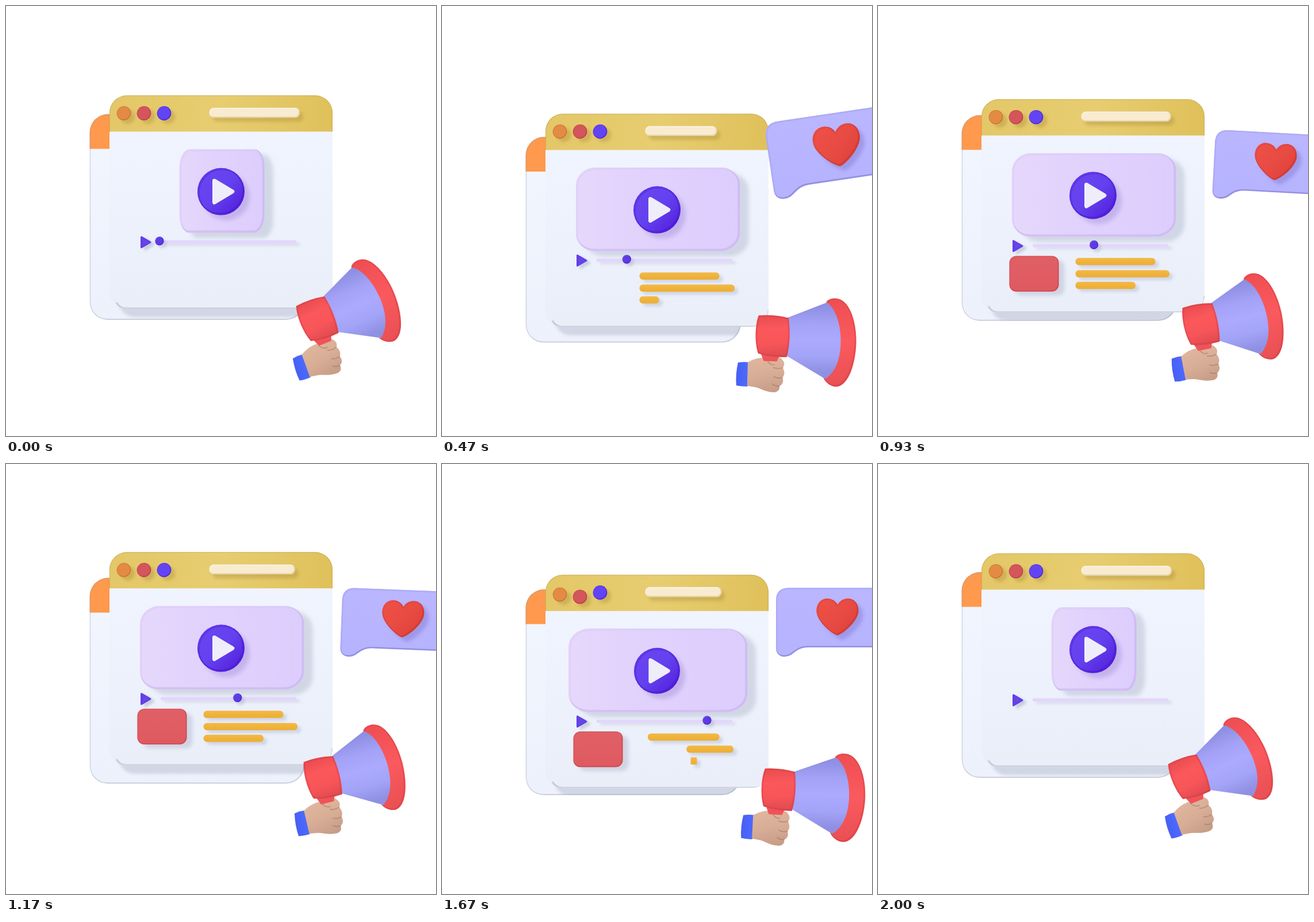
These frames come from a looping animation (748x748 px, 2030 ms). An HTML page with a canvas:

```html
<!DOCTYPE html>
<html lang="en">
<head>
<meta charset="utf-8">
<title>Video window and megaphone</title>
<style>
html, body { margin: 0; width: 100%; height: 100%; overflow: hidden; background: #fff; }
canvas { display: block; width: 748px; height: 748px; }
</style>
</head>
<body>
<canvas id="stage" width="748" height="748"></canvas>
<script>
const ctx = document.getElementById('stage').getContext('2d');
const LOOP = 2030, STEP = 1000 / 30;

// Monotone cubic through [frame, value, frame, value, ...], flat at the ends and turning points.
function track(f, keys) {
  const n = keys.length / 2, x = i => keys[2 * i], y = i => keys[2 * i + 1];
  if (f <= x(0)) return y(0);
  if (f >= x(n - 1)) return y(n - 1);
  const slope = i => (y(i + 1) - y(i)) / (x(i + 1) - x(i));
  const tangent = i => {
    if (i === 0 || i === n - 1) return 0;
    const a = slope(i - 1), b = slope(i);
    return a * b <= 0 ? 0 : 2 * a * b / (a + b);
  };
  let i = 0;
  while (f > x(i + 1)) i++;
  const h = x(i + 1) - x(i), u = (f - x(i)) / h, s = u * u * (3 - 2 * u);
  return y(i) + (y(i + 1) - y(i)) * s +
    h * u * (1 - u) * ((1 - u) * tangent(i) - u * tangent(i + 1));
}

const wave = (f, peak) => Math.cos((f - peak) * Math.PI / 15);

function bump(f, peak, half) {
  const d = Math.abs(f - peak);
  return d < half ? (1 + Math.cos(Math.PI * d / half)) / 2 : 0;
}

function box(x, y, w, h, r) {
  const p = new Path2D();
  p.roundRect(x, y, Math.max(w, 0), h, r);
  return p;
}

function disc(x, y, r) {
  const p = new Path2D();
  p.arc(x, y, r, 0, Math.PI * 2);
  return p;
}

function ramp(x0, y0, x1, y1, ...colors) {
  const g = ctx.createLinearGradient(x0, y0, x1, y1);
  colors.forEach((c, i) => g.addColorStop(i / (colors.length - 1), c));
  return g;
}

function paint(path, fill, dx = 0, dy = 0, blur = 0, shade = 'rgba(125,135,160,.25)') {
  ctx.save();
  if (dx || dy) {
    ctx.shadowColor = shade;
    ctx.shadowOffsetX = dx;
    ctx.shadowOffsetY = dy;
    ctx.shadowBlur = blur;
  }
  ctx.fillStyle = fill;
  ctx.fill(path);
  ctx.restore();
}

// Lit rim at the top left and shaded rim at the bottom right, inside a shape.
function bevel(path, dark, light, width = 3) {
  ctx.save();
  ctx.clip(path);
  ctx.lineWidth = width;
  for (const [color, d] of [[light, width / 2], [dark, -width / 2]]) {
    ctx.save();
    ctx.translate(d, d);
    ctx.strokeStyle = color;
    ctx.stroke(path);
    ctx.restore();
  }
  ctx.restore();
}

function at(x, y, angle, scale, draw) {
  if (scale <= 0.001) return;
  ctx.save();
  ctx.translate(x, y);
  ctx.rotate(angle * Math.PI / 180);
  ctx.scale(scale, scale);
  draw();
  ctx.restore();
}

function backWindow(f) {
  const y = 208 - 20 * wave(f, 0);
  const shape = box(145.5, y, 374, 358, 32);
  paint(shape, ramp(0, y, 0, y + 357, '#f2f6ff', '#edf1fb'));
  ctx.save();
  ctx.clip(shape);
  ctx.fillStyle = '#fe994d';
  ctx.fillRect(145, y, 375, 60.5);
  ctx.restore();
  bevel(shape, 'rgba(150,155,175,.4)', 'rgba(150,155,175,.25)', 2);
  return shape;
}

function frontWindow(top, back) {
  const shape = box(180, top, 388, 370.5, [30, 30, 28, 28]);
  const body = ramp(0, top, 0, top + 370, '#f1f5ff', '#eef2fd', '#eaeef9');
  ctx.save();
  ctx.clip(back);
  paint(shape, body, 16, 15, 5, 'rgba(150,157,182,.32)');
  ctx.restore();
  paint(shape, body);
  ctx.save();
  ctx.clip(shape);
  ctx.strokeStyle = 'rgba(165,172,192,.5)';
  ctx.lineWidth = 3;
  ctx.beginPath();
  ctx.moveTo(192, top + 360);
  ctx.quadraticCurveTo(198, top + 370, 208, top + 370.5);
  ctx.lineTo(540, top + 370.5);
  ctx.quadraticCurveTo(568, top + 370.5, 568, top + 342);
  ctx.stroke();
  ctx.restore();
  const head = box(180, top, 388, 63, [30, 30, 0, 0]);
  paint(head, ramp(180, top, 568, top + 63, '#e3c768', '#e7cd70', '#dfc05a'));
  ctx.save();
  ctx.clip(head);
  ctx.strokeStyle = 'rgba(165,135,50,.4)';
  ctx.lineWidth = 2;
  ctx.stroke(box(180, top, 388, 90, 30));
  ctx.restore();
}

const dots = [
  { x: 205, fill: '#e38b44', rim: '#c87132', up: 8, down: 52.1 },
  { x: 240, fill: '#d4555c', rim: '#b93e48', up: 6, down: 49.6 },
  { x: 275, fill: '#6244f4', rim: '#4826d2', up: 4, down: 46 }
];

function header(f, top) {
  const shade = 'rgba(150,120,40,.28)';
  for (const d of dots) {
    const y = top + 31 - 8 * bump(f, d.up, 4) + 7.5 * bump(f, d.down, 4);
    const c = disc(d.x, y, 12.3);
    paint(c, d.fill, 7, 6, 5, shade);
    bevel(c, d.rim, 'rgba(0,0,0,.06)', 1.5);
  }
  const bar = box(353.5, top + 21.3, 141 + 16.5 * wave(f, 0), 17.4, 8);
  paint(bar, '#f8ebd0', 6, 7, 5, shade);
  bevel(bar, 'rgba(205,180,125,.4)', 'rgba(255,255,255,.3)', 2);
}

// Right-pointing triangle with rounded corners, drawn around the origin.
function triangle(left, right, half, round, fill) {
  const p = new Path2D();
  p.moveTo(left + round, -half + round);
  p.lineTo(right - round, 0);
  p.lineTo(left + round, half - round);
  p.closePath();
  ctx.fillStyle = ctx.strokeStyle = fill;
  ctx.lineWidth = round * 2;
  ctx.lineJoin = 'round';
  ctx.fill(p);
  ctx.stroke(p);
}

function player(f, top) {
  const w = track(f, [0, 148, 8, 311, 13, 285.5, 45, 285.5, 50, 311, 60, 148]);
  const rx = 33 * w / 285, ry = 31;
  const card = new Path2D();
  card.roundRect(375.8 - w / 2, top + 93.7, w, 145.3, { x: rx, y: ry });
  paint(card, ramp(375 - w / 2, 0, 375 + w / 2, 0, '#e6d7fb', '#e0d1fd', '#dccdfd'), 15, 9, 7);
  bevel(card, 'rgba(188,163,228,.4)', 'rgba(215,195,240,.3)', 4);

  const r = 41 - 5.3 * (bump(f, 8, 6.3) + bump(f, 45.5, 6.3));
  at(374, top + 167.2, 0, r / 41, () => {
    const c = disc(0, 0, 41);
    paint(c, ramp(-30, -30, 30, 30, '#6845f0', '#6441ee', '#5524df'), 9, 9, 7, 'rgba(115,95,180,.25)');
    bevel(c, 'rgba(72,20,205,.45)', 'rgba(85,35,220,.45)', 4);
    triangle(-15, 23.3, 22.3, 3.5, '#efedf9');
  });

  const mid = top + 254.8;
  ctx.save();
  ctx.shadowColor = 'rgba(125,135,160,.25)';
  ctx.shadowOffsetX = 6;
  ctx.shadowOffsetY = 4;
  ctx.shadowBlur = 4;
  ctx.translate(234, mid + .5);
  triangle(0, 18.5, 10.5, 1.5, '#6340ea');
  ctx.restore();
  paint(box(269, mid - 2.8, 236, 5.6, 2), '#e3d6fc', 6, 4, 4, 'rgba(140,145,175,.2)');
  const knob = track(f, [54, 7.6, 59, 0]);
  if (knob > 0.1) {
    const c = disc(267 + 3.88 * f, mid - 1.6, knob);
    paint(c, '#5d3be4', 5, 5, 4);
    bevel(c, '#4f29d3', 'rgba(255,255,255,.08)', 1.5);
  }
}

const lines = [
  { y: 276, right: [2, 0, 7, 143.5, 11, 139], left: [48.5, 0, 56, 139] },
  { y: 297.2, right: [5, 0, 12, 167, 20, 158, 26, 163.5], left: [46.5, 0, 53.5, 163.5] },
  { y: 317.6, right: [11, 0, 19, 108, 25, 104.5, 45, 104.5, 50, 100], left: [44.7, 0, 51.7, 104.5] }
];

function details(f, top) {
  for (const l of lines) {
    const a = track(f, l.left), w = track(f, l.right) - a;
    if (w < 1) continue;
    const y = top + l.y;
    const bar = box(343.5 + a, y, w, 12.5, Math.min(5.8, w / 6));
    paint(bar, ramp(0, y, 0, y + 12, '#f3b945', '#ecae35'), 6, 5, 5);
  }
  const s = track(f, [20, 0, 25, 1.06, 28, 1, 51, 1, 53, 1.05, 58, 0]);
  at(271.5, top + 303.5, 0, s, () => {
    const card = box(-43, -31, 86, 62, 12);
    paint(card, ramp(0, -31, 0, 31, '#e06066', '#df5a60'), 10, 7, 6);
    bevel(card, 'rgba(185,55,65,.45)', 'rgba(205,75,80,.4)', 2);
  });
}

const bubblePath = new Path2D('M-15-96Q-15-117.5 7-117.5H179Q199-117.5 199-97V-34Q199-14 179-14H42C27-14 21-8 13-2C6 3-5 4-11-2C-14-5-15-9-15-14Z');
const heartPath = new Path2D('M0 32C-9 30-36 8-36.5-10C-37-25-27-32-18-32C-9-32-3-27 0-21C3-27 9-32 18-32C27-32 37-25 36.5-10C36 8 9 30 0 32Z');

function bubble(f) {
  const scale = track(f, [2, 0, 8, 1.2, 20, 1.035, 26, 1, 51, 1, 53, 1.05, 59, 0]);
  const angle = track(f, [2, -14, 8, -11, 20, -5.3, 28, 3.1, 41, 1.1, 50, 0, 58, -4]);
  at(596, 333, angle, scale, () => {
    paint(bubblePath, ramp(0, -117, 0, 0, '#bab6ff', '#b6b3ff'));
    bevel(bubblePath, 'rgba(125,122,205,.6)', 'rgba(150,147,228,.3)', 2.5);
    ctx.translate(92, -67);
    paint(heartPath, ramp(-30, -30, 30, 30, '#ee5046', '#e84b43', '#dd4039'), 8, 8, 6, 'rgba(95,90,180,.3)');
    bevel(heartPath, 'rgba(190,45,42,.4)', 'rgba(205,60,55,.25)', 3);
  });
}

const ring = new Path2D('M92-62C95-67 104-70 112-68C134-64 146-25 146 8C146 42 136 81 115 85C106 86 96 80 91 71Z');
const cone = new Path2D('M22-31L93-61C110-50 119-20 119 9C119 38 111 60 94 72L26 34Z');
const barrel = new Path2D('M-25-35Q2-38 27-32C31-10 31 14 26 36Q0 38-24 31C-31 12-31-19-25-35Z');
const grip = new Path2D('M-19 32L13 34L9 44L-14 44Z');
const fist = new Path2D('M-42 47C-31 41-24 38-9 38C2 36 14 35 18 41C23 46 22 52 19 55C23 61 23 68 19 72C22 79 19 85 14 87C16 94 10 99 3 98C-10 98-18 92-28 90L-42 88Z');
const knuckles = new Path2D('M19 55Q10 58 3 55M19 72Q11 75 4 71M14 87Q7 88 2 84M-9 42Q-3 52 4 50');
const cuff = new Path2D('M-59 48Q-49 46-40 47Q-37 67-41 89Q-52 90-61 88Q-63 68-59 48Z');

const pose = {
  x: [-10, 585, 0, 541, 8, 573, 20, 575.5, 28, 561.5, 41, 546, 50, 585, 60, 541, 68, 573],
  y: [-10, 566, 0, 545, 8, 570, 15, 574, 20, 571.5, 28, 554, 41, 543, 50, 566, 60, 545, 68, 570],
  angle: [-10, 3.2, 0, -22, 8, 0, 20, 2.3, 28, -12, 41, -15.2, 50, 3.2, 60, -22, 68, 0],
  reach: [-10, 1.04, 0, .97, 8, 1, 20, 1, 28, .97, 41, .965, 50, 1.04, 60, .97, 68, 1]
};

function hand() {
  paint(cuff, ramp(-60, 0, -40, 0, '#4860f4', '#4d6aff'));
  paint(fist, ramp(-20, 38, -6, 98, '#dfb59e', '#d8ad96', '#c79d88'));
  ctx.strokeStyle = 'rgba(150,104,86,.45)';
  ctx.lineWidth = 1.8;
  ctx.lineCap = 'round';
  ctx.stroke(knuckles);
}

function megaphone(f) {
  const angle = track(f, pose.angle);
  at(track(f, pose.x), track(f, pose.y), angle, 1, () => {
    // The wrist turns a little less than the horn.
    at(.17 * angle, -.08 * angle, -.1 * angle, 1, hand);
    paint(grip, '#ef5358');
    ctx.save();
    ctx.scale(track(f, pose.reach), 1);
    paint(ring, ramp(100, -68, 125, 85, '#ee4e51', '#fa5a5d', '#e84f53'));
    bevel(ring, 'rgba(200,55,62,.35)', 'rgba(205,60,65,.2)', 3);
    paint(cone, ramp(60, -52, 64, 62, '#8f8fe4', '#a3a2f6', '#abaaff', '#a3a3f8', '#8f90e2'));
    ctx.restore();
    paint(barrel, ramp(-4, -36, 4, 37, '#e94c4f', '#fb585c', '#f85559', '#de4b50'));
    bevel(barrel, 'rgba(195,55,60,.3)', 'rgba(205,55,60,.3)', 3);
  });
}

function render(now) {
  const t = Math.max(0, now - start) % LOOP;
  const f = Math.min(60, Math.floor((t + 3.4) / STEP));
  const top = 173 - 21.5 * wave(f, 3);
  ctx.fillStyle = '#fff';
  ctx.fillRect(0, 0, 748, 748);
  frontWindow(top, backWindow(f));
  header(f, top);
  player(f, top);
  details(f, top);
  bubble(f);
  megaphone(f);
  requestAnimationFrame(render);
}

const start = performance.now();
render(start);
</script>
</body>
</html>
```
